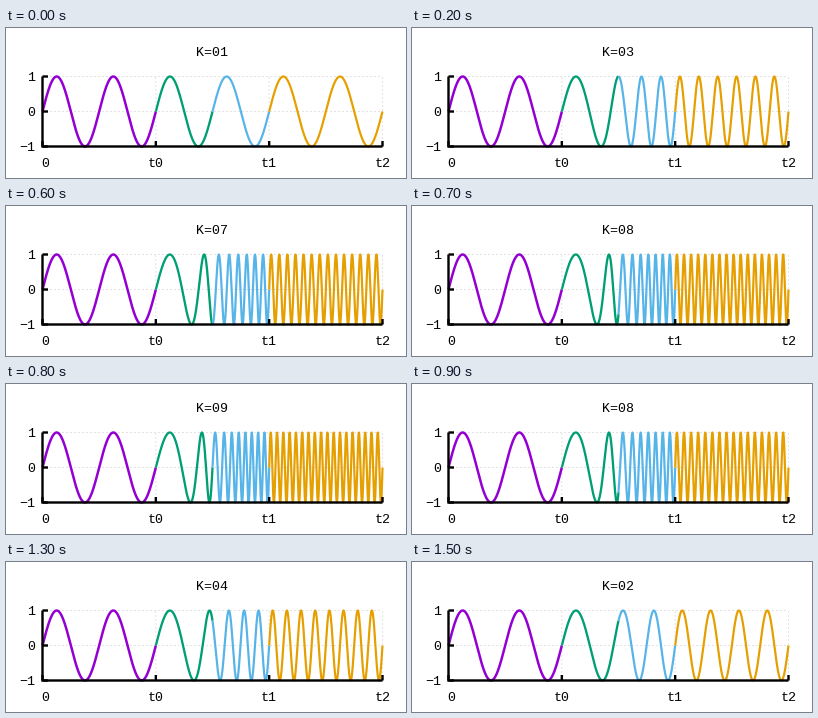
Recreate the animation shown at these times as a matplotlib script. Size 400x150 px, loop 1.6 s.

```python
import numpy as np
import matplotlib.pyplot as plt
from matplotlib.animation import FuncAnimation

W, H, DPI = 400, 150, 100
PX = 72 / DPI  # points per pixel
LEFT, RIGHT, TOP, BOTTOM = 36.5, 376.5, 48.5, 118.5
MID = (TOP + BOTTOM) / 2
SPAN = (RIGHT - LEFT) / 3
FRAMES = 16

plt.rcParams["font.family"] = "Liberation Mono"
plt.rcParams["font.size"] = 13.33 * PX

fig = plt.figure(figsize=(W / DPI, H / DPI), dpi=DPI, facecolor="white")
ax = fig.add_axes([0, 0, 1, 1])
ax.set_xlim(0, W)
ax.set_ylim(H, 0)
ax.axis("off")


def stroke(xs, ys, color="black", width=2, **kw):
    return ax.plot(xs, ys, color=color, lw=width * PX, clip_on=False,
                   snap=False, **kw)[0]


def label(x, baseline, text, ha="center"):
    return ax.text(x, baseline, text, ha=ha, va="baseline", color="black")


def cycles(t, k):
    """Phase in cycles: rate 2, cubic ease from 2 to 2k, then rate 2k."""
    u = np.clip(t - 1, 0, 1)
    eased = np.where(u < 0.5, u**4, u - 0.5 + (1 - u)**4)
    eased = eased + np.maximum(t - 2, 0)
    return 2 * t + 2 * (k - 1) * eased


# Dotted grid
ticks_x = [LEFT + i * SPAN for i in range(4)]
ticks_y = [TOP, MID, BOTTOM]
grid = dict(color="#c8c8c8", width=1, dashes=(1, 3), zorder=1)
for x in ticks_x[1:]:
    stroke([x, x], [BOTTOM, TOP], **grid)
for y in ticks_y[:2]:
    stroke([LEFT, RIGHT], [y, y], **grid)

# Axes and inward ticks
frame = dict(width=2.4, zorder=4, solid_capstyle="butt")
stroke([LEFT, LEFT, RIGHT], [TOP, BOTTOM, BOTTOM],
       solid_joinstyle="miter", **frame)
for x in ticks_x:
    stroke([x, x], [BOTTOM, BOTTOM - 5.5], **frame)
for y in ticks_y:
    stroke([LEFT, LEFT + 5.5], [y, y], **frame)

for x, text in zip(ticks_x, [" 0", "t0", "t1", "t2"]):
    label(x, 139, text)
for y, text in zip(ticks_y, ["1", "0", "\N{MINUS SIGN}1"]):
    label(29, y + 4.5, text, ha="right")
title = label(206, 28, "")

# Wave pieces: start, end, colour, width
pieces = [(0, 1, "#9400d3", 2.5), (1, 1.5, "#009e73", 2.3),
          (1.5, 2, "#56b4e9", 2.2), (2, 3, "#e69f00", 2.2)]
waves = []
for start, end, color, width in pieces:
    t = np.linspace(start, end, int(600 * (end - start)) + 1)
    line = stroke(LEFT + t * SPAN, 0 * t + MID, color, width, zorder=3,
                  solid_joinstyle="round", solid_capstyle="butt")
    waves.append((t, line))


def draw(i):
    k = 9 - abs(8 - i)
    title.set_text(f"K={k:02d}")
    for t, line in waves:
        line.set_ydata(MID - (BOTTOM - MID) * np.sin(2 * np.pi * cycles(t, k)))
    return [title] + [line for _, line in waves]


anim = FuncAnimation(fig, draw, frames=FRAMES, interval=100,
                     repeat=True, repeat_delay=0, blit=False)
plt.show()
```
